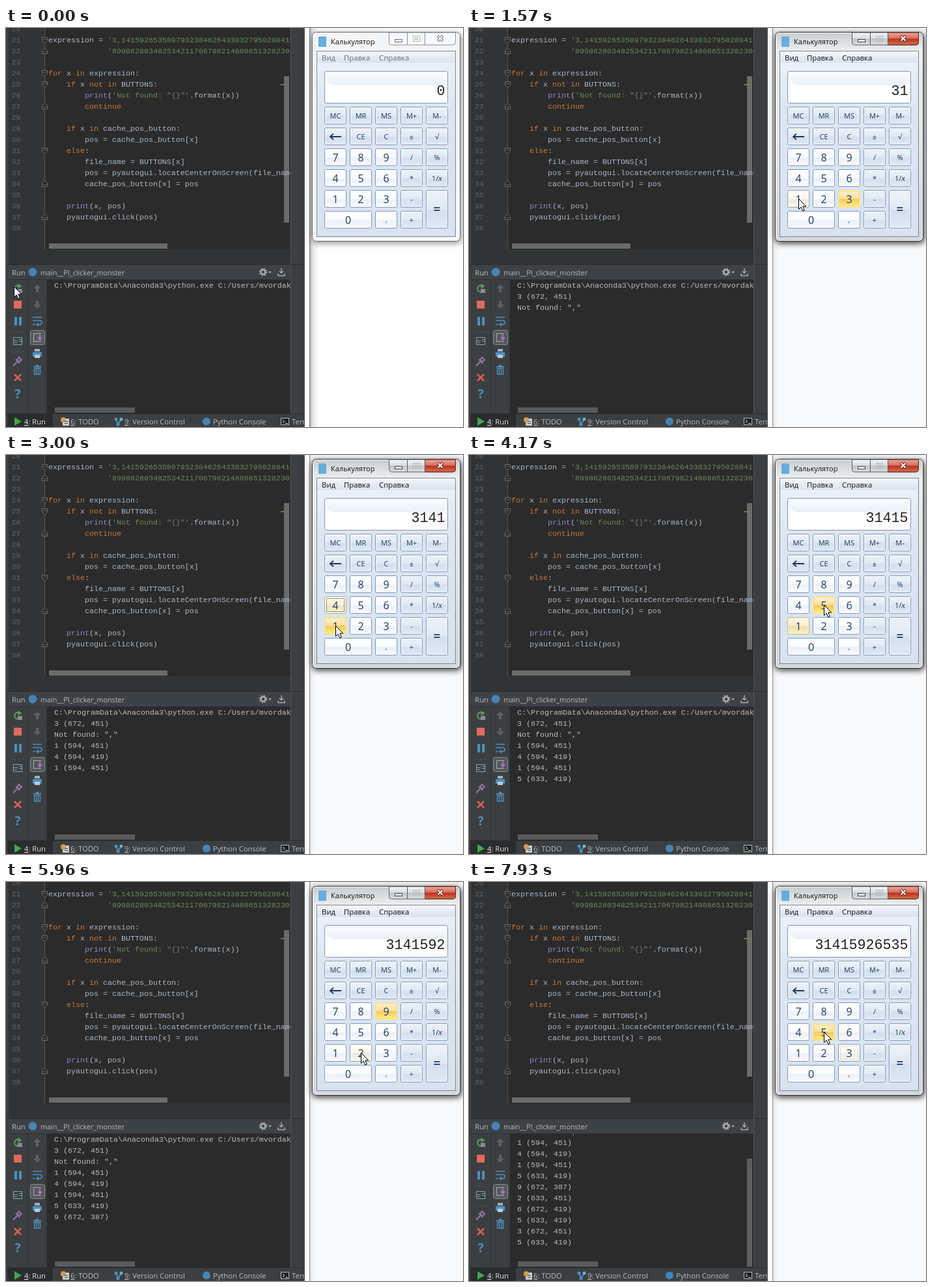
Write an HTML page that moves like this. It is 702x613 px and loops after 8 s.

```html
<!DOCTYPE html>
<html lang="en">
<head>
<meta charset="utf-8">
<title>Calculator clicker</title>
<style>
html, body { margin: 0; width: 702px; height: 613px; overflow: hidden; background: #fff; }
svg { display: block; }
text { white-space: pre; }
.mono { font: 11.667px "Liberation Mono", monospace; }
.ui { font: 11.2px "Open Sans", sans-serif; }
.digits { font: 21.67px "Liberation Mono", monospace; }
.num { font: 16px "Open Sans", sans-serif; }
.op { font: 11px "Open Sans", "DejaVu Sans", sans-serif; }
.equals { font: 600 19px "Open Sans", sans-serif; }
</style>
</head>
<body>
<svg id="stage" width="702" height="613" xmlns="http://www.w3.org/2000/svg"></svg>
<script>
const LOOP = 8000, FADE = 880;
// enter time, digit, delay until the click registers
const MOVES = [[460, 3], [1570, 1], [2640, 4], [2730, 1], [3720, 5], [4710, 9], [5960, 2],
  [7030, 6], [7075, 5, 45], [7120, 3, 90], [7210, 5, 90]];
// time, number of console lines
const PRINTS = [[0, 1], [640, 3], [1750, 4], [2820, 6], [3900, 7], [4890, 8], [6140, 9], [7210, 13]];

const col = i => 489 + 39 * i, row = i => 121 + 32 * i;
const spot = d => [col((d - 1) % 3), row(4 - Math.floor((d - 1) / 3))];

const rect = (x, y, w, h, fill, more = '') =>
  `<rect x="${x}" y="${y}" width="${w}" height="${h}" fill="${fill}" ${more}/>`;
const path = (d, stroke, more = 'fill="none"') => `<path d="${d}" stroke="${stroke}" ${more}/>`;
const label = (x, y, s, cls, fill, more = '') =>
  `<text x="${x}" y="${y}" class="${cls}" fill="${fill}" ${more}>${s}</text>`;
const grad = (id, ...stops) => `<linearGradient id="${id}" x2="0" y2="1">` +
  stops.map(([o, c]) => `<stop offset="${o}" stop-color="${c}"/>`).join('') + '</linearGradient>';
const sideGrad = (id, from, to) => `<linearGradient id="${id}"><stop stop-color="${from}"/>` +
  `<stop offset=".4" stop-color="${to}" stop-opacity=".35"/><stop offset="1" stop-color="${to}" stop-opacity="0"/></linearGradient>`;
const clip = (id, x, y, w, h) => `<clipPath id="${id}">${rect(x, y, w, h, '#000')}</clipPath>`;

const defs = `<defs>
${grad('numBg', [0, '#fff'], [.5, '#fafcff'], [.52, '#eaf0f9'], [1, '#f8fbff'])}
${grad('opBg', [0, '#edf3fa'], [.5, '#e0e9f4'], [.52, '#d3dfee'], [1, '#dfe9f6'])}
${grad('hotBg', [0, '#fdf0d2'], [.48, '#fbe0a0'], [.52, '#f8c85c'], [1, '#fff08a'])}
${grad('client', [0, '#eef3fa'], [.3, '#dce6f2'], [1, '#d8e3f1'])}
${grad('menuBg', [0, '#fafbfe'], [.45, '#e6ebf6'], [1, '#dbe3f1'])}
${grad('screen', [0, '#f4f8fd'], [.45, '#fff'], [1, '#fff'])}
${grad('gloss', [0, '#fbfdff'], [1, '#e8f0f9'])}
${grad('glass', [0, '#c9cccf'], [.09, '#eceeef'], [.5, '#e4e7ea'], [1, '#d3d7db'])}
${grad('glassIdle', [0, '#f3f4f5'], [1, '#f7f8f9'])}
${grad('close', [0, '#eba99b'], [.48, '#d9695a'], [.52, '#b9301c'], [1, '#d6714c'])}
${grad('cap', [0, '#f4f5f6'], [.48, '#dadde0'], [.52, '#bfc3c7'], [1, '#dde0e3'])}
${sideGrad('edge', '#a9a9a9', '#bbb')}${sideGrad('edgeSoft', '#d9dadd', '#dcdde0')}
<filter id="blur" x="-20%" y="-20%" width="140%" height="140%"><feGaussianBlur stdDeviation="5"/></filter>
${clip('code', 0, 0, 437, 340)}${clip('out', 64, 387, 373, 194)}${clip('ide', 0, 0, 459, 613)}
</defs>`;

const KEY = '#cc7832', STR = '#6a8759', FN = '#8888c6';
const paint = (c, s) => `<tspan fill="${c}">${s}</tspan>`;
const kw = s => paint(KEY, s), str = s => paint(STR, s), fn = s => paint(FN, s);
const CODE = {
  21: `expression = ${str("'3,14159265358979323846264338327950288419716")}`,
  22: ' '.repeat(13) + str("'8998628034825342117067982148086513282306647"),
  24: `${kw('for')} x ${kw('in')} expression:`,
  25: `    ${kw('if')} x ${kw('not in')} BUTTONS:`,
  26: `        ${fn('print')}(${str(`'Not found: "{}"'`)}.format(x))`,
  27: `        ${kw('continue')}`,
  29: `    ${kw('if')} x ${kw('in')} cache_pos_button:`,
  30: '        pos = cache_pos_button[x]',
  31: `    ${kw('else')}:`,
  32: '        file_name = BUTTONS[x]',
  33: '        pos = pyautogui.locateCenterOnScreen(file_name)',
  34: '        cache_pos_button[x] = pos',
  36: `    ${fn('print')}(x, pos)`,
  37: '    pyautogui.click(pos)'
};

function editor() {
  let s = rect(4, 0, 56, 340, '#313335') + rect(60, 0, 377, 340, '#2b2b2b') +
    rect(427, 74, 8, 225, '#696b6c') + rect(422, 86, 13, 2, '#77734a') + rect(66, 331, 182, 8, '#696b6c') +
    path('M59.5 0V340', '#55585a');
  for (let n = 20; n <= 38; n++) {
    const y = 22 + 17 * (n - 21);
    s += label(8.5, y, n, 'mono', '#606366');
    if (CODE[n]) s += label(65, y, CODE[n], 'mono', '#a9b7c6');
  }
  const fold = (n, k) => {
    const y = 18.5 + 17 * (n - 21);
    s += path(`M55.5 ${y - 4 * k}h8v${5 * k}l-4 ${4 * k}l-4 ${-4 * k}zM57.5 ${y - k}h4`, '#6c6f71', 'fill="#2b2b2b"');
  };
  [21, 24, 25, 31].forEach(n => fold(n, 1));
  [22, 27, 34, 37].forEach(n => fold(n, -1));
  return rect(0, 0, 459, 613, '#3c3f41') + `<g clip-path="url(#code)">${s}</g>` +
    rect(4, 340, 433, 23, '#313335') + path('M0 363.500H459', '#2a2c2d');
}

function icons() {
  const blue = '#4d90bf', grey = '#5c6063', red = '#dd5f52', line = 'fill="none" stroke-width="2"';
  return path('M21 396.5a5 5 0 1 0 2 5', '#57a05b', line) + path('M18.500 393l6 3.500l-6 4z', 'none', 'fill="#57a05b"') +
    rect(18, 401, 7, 6, '#8b8f92') +
    rect(12, 419, 12, 12, '#e06a5c') + rect(13, 444, 4, 13, blue) + rect(20, 444, 4, 13, blue) +
    path('M8 467.500H29M8 497.500H29', '#5c6063', 'stroke-dasharray="1 2"') +
    path('M11.5 475.500h13v11h-13zM11 480.500h7M20 478.500h4M20 481.500h4M13 483.500h4', '#7fa3ba') +
    path('M11 519l6-6M15 509l6 6M17 510l3-4l4 4l-4 3z', '#9776ab', line) +
    path('M13 532l10 10M23 532l-10 10', red, 'stroke-width="2.500"') +
    label(18, 569, '?', 'ui', blue, 'text-anchor="middle" style="font-size:19px;font-weight:700"') +
    path('M48 394l6 6h-4v6h-4v-6h-4z', 'none', `fill="${grey}"`) +
    path('M48 431l6-6h-4v-6h-4v6h-4z', 'none', `fill="${grey}"`) +
    path('M41 444.500h14M41 449.500h11q3 0 3 3t-3 3h-4M41 455.500h4M50 453l-3 2.500l3 2.500', blue, 'fill="none" stroke-width="1.500"') +
    rect(37.5, 464.5, 22, 22, '#54595c', 'rx="3" stroke="#898d90"') +
    path('M42 469.500h12M42 481.500h12M42.500 470v11', '#a9adb0') + path('M52 471v7M49 475l3 4l3-4', '#b06fc0', line) +
    rect(41, 498, 14, 7, blue) + rect(44, 493, 8, 4, '#9ab3c4') + rect(44, 502, 8, 5, '#c0ccd4') +
    path('M42 520.500h12M46 518.500h4', blue, line) + path('M43.500 523h9v9h-9zM46.500 524v7M49.500 524v7', blue, 'fill="none" stroke-width="1.400"');
}

const LINES = [String.raw`C:\ProgramData\Anaconda3\python.exe C:/Users/mvordak/PycharmProjects`, ...[3, 0, 1, 4, 1, 5, 9, 2, 6, 5, 3, 5].map(d => {
  if (!d) return 'Not found: ","';
  const [x, y] = spot(d);
  return `${d} (${x + 105}, ${y + 202})`;
})];

function runPanel() {
  const tone = '#bbbbbb', tab = (x, key, s, fill = tone) =>
    label(x, 609, key ? `<tspan text-decoration="underline">${key}</tspan>: ${s}` : s, 'ui', fill);
  return rect(4, 364, 433, 22, '#3d4247') + path('M0 386.5H437', '#2f3133') +
    label(9, 380, 'Run', 'ui', tone) + '<circle cx="41" cy="375" r="6.5" fill="#4584b6"/>' +
    label(53, 380, 'main__PI_clicker_monster', 'ui', tone, 'style="font-size:10.85px"') +
    '<circle cx="395" cy="375" r="3.500" fill="none" stroke="#a9adaf" stroke-width="2.500"/>' +
    '<circle cx="395" cy="375" r="5.500" fill="none" stroke="#a9adaf" stroke-width="1.600" stroke-dasharray="2.200 2.120"/>' +
    path('M403 374h5l-2.500 3z', 'none', 'fill="#a9adaf"') +
    path('M423 369v7M420 373.500l3 3l3-3M418 377v3.500h10V377', '#a9adaf', 'fill="none" stroke-width="1.400"') +
    rect(63, 387, 374, 205, '#2b2b2b') + path('M33.500 387V592M62.500 387V592', '#323537') + icons() +
    rect(75, 583, 123, 8, '#595b5d') + rect(427, 425, 8, 166, '#5b5d5f', 'id="bar"') +
    `<g clip-path="url(#out)"><g id="lines">${LINES.map((s, i) => label(74, 399 + 17 * i, s, 'mono', tone)).join('')}</g></g>` +
    path('M437.500 0V592', '#515457') +
    rect(0, 592, 459, 21, '#3c3f41') + path('M0 592.500H459', '#2a2c2d') + rect(2, 593, 70, 20, '#2a2c2e') +
    '<g clip-path="url(#ide)">' +
    path('M13 598l11 6.500l-11 6.500z', 'none', 'fill="#3faa4c"') + tab(28, '4', 'Run', '#e4e4e4') +
    rect(87, 600, 10, 11, '#c9cdd0', 'rx="1"') + '<circle cx="88" cy="602" r="4" fill="#d59b4c"/>' + path('M90 604.500h5M90 607.500h5', '#4a4e51') + tab(99, '6', 'TODO') +
    path('M169 600l3 9l5-8', '#4d90bf', 'fill="none" stroke-width="2"') +
    '<circle cx="169" cy="601" r="2.500" fill="#4d90bf"/><circle cx="177" cy="601" r="2.500" fill="#6ab0d8"/><circle cx="172" cy="609" r="2.500" fill="#4d90bf"/>' + tab(182, '9', 'Version Control') +
    '<circle cx="308" cy="604.500" r="6" fill="#4584b6"/>' + tab(318, '', 'Python Console') +
    rect(422.5, 599.500, 12, 10, '#1d1f20', 'stroke="#b5b8ba"') + path('M425 602l3 2.500l-3 2.500M429 607.500h4', '#ddd') + tab(439, '', 'Terminal') + '</g>';
}

function button(x, y, w, h, s, cls, id = '') {
  const cx = x + w / 2, isNum = cls === 'num';
  const hot = id && `<g id="hot${id}" opacity="0">` +
    rect(x + .5, y + .5, w - 1, h - 1, 'url(#hotBg)', 'rx="2" stroke="#f6e5b8"') +
    rect(x + 1.500, y + 1.500, w - 3, h - 3, 'none', 'rx="1" stroke="#ffe24e"') + '</g>' +
    rect(x + 3.500, y + 3.500, w - 7, h - 7, 'none', `id="dots${id}" stroke="#333" stroke-dasharray="1 1" opacity="0"`);
  const drop = { num: 6.500, op: 4, equals: 6.500 }[cls];
  const text = s === '←'
    ? path(`M${cx + 9} ${y + 14}h-17m5-4.500l-5 4.500l5 4.500`, '#1e395b', 'fill="none" stroke-width="1.800"')
    : label(cx, y + h / 2 + drop, s, cls, '#1e395b', 'text-anchor="middle"');
  return rect(x + .5, y + .5, w - 1, h - 1, isNum || s === ',' ? 'url(#numBg)' : 'url(#opBg)', 'rx="2" stroke="#8297b5"') +
    rect(x + 1.500, y + 1.500, w - 3, h - 3, 'none', 'rx="1" stroke="#fff" stroke-opacity=".75"') + hot + text;
}

function keypad() {
  const keys = ['MC MR MS M+ M-', '← CE C ± √', '7 8 9 / %', '4 5 6 * 1/x', '1 2 3 -'];
  let s = '';
  keys.forEach((r, j) => r.split(' ').forEach((k, i) => {
    const num = /^\d$/.test(k);
    const face = k === '1/x' ? '1/<tspan font-style="italic" font-family="Liberation Serif, serif" font-size="13">x</tspan>' : k;
    s += button(col(i), row(j), 34, 27, face, num ? 'num' : 'op', num ? k : '');
  }));
  return s + button(489, 281, 73, 27, '0', 'num') + button(567, 281, 34, 27, ',', 'op') +
    button(606, 281, 34, 27, '+', 'op') + button(645, 249, 34, 59, '=', 'equals');
}

function frame(on) {
  const ink = on ? '#3d4045' : '#6d7175', edge = on ? '#5a5d61' : '#8d9195';
  const back = on ? 'url(#cap)' : '#f8f9fa';
  return `<g id="${on ? 'active' : 'idle'}">` +
    (on ? rect(466, 0, 236, 613, '#f8f9fb') : '') + rect(466, 0, on ? 9 : 14, 613, on ? 'url(#edgeSoft)' : 'url(#edge)') +
    path('M466.500 0V613', on ? '#8b8d90' : '#77797c') +
    rect(470, 8, 230, 323, '#000', `rx="8" filter="url(#blur)" opacity="${on ? .75 : .42}"`) +
    rect(470.5, 6.500, 227, 321, on ? 'url(#glass)' : 'url(#glassIdle)', `rx="6" stroke="${on ? '#33363a' : '#65696d'}"`) +
    rect(471.5, 7.500, 225, 319, 'none', 'rx="5" stroke="#fff" stroke-opacity=".8"') +
    path('M588.500 7V22q0 4 4 4H686.500q4 0 4-4V7z', edge, `fill="${back}"`) +
    (on ? path('M643.500 7V26H686.500q4 0 4-4V7z', '#5b211a', 'fill="url(#close)"') : '') +
    path('M616.500 7V26M643.500 7V26', edge) +
    rect(597.5, 17.500, 11, 4, '#fff', `stroke="${ink}"`) +
    rect(625.5, 12.500, 10, 8, 'none', 'stroke="#b4b7ba"') + rect(628.5, 15.500, 4, 2, 'none', 'stroke="#b4b7ba"') +
    path('M663 12l8 8M671 12l-8 8', on ? '#5b2a25' : ink, 'stroke-width="4"') +
    path('M663.500 12.500l7 7M670.500 12.500l-7 7', '#fff', 'stroke-width="2"') + '</g>';
}

function calculator() {
  const menu = [[485, 'Вид'], [519, 'Правка'], [573, 'Справка']].map(([x, s]) =>
    label(x, 50, s, 'ui', 'currentColor', 'style="font-size:11.4px"')).join('');
  return frame(false) + frame(true) +
    rect(480, 13, 12, 16, '#64aede', 'rx="1"') + label(499, 25, 'Калькулятор', 'ui', '#111', 'style="font-size:11px"') +
    rect(477.5, 35.500, 213, 285, 'url(#client)', 'stroke="#7e868f"') + rect(478, 36, 212, 18, 'url(#menuBg)') +
    path('M478 54.500H690', '#f3f6fb') + `<g id="menu">${menu}</g>` +
    rect(489.5, 66.500, 189, 49, 'url(#screen)', 'rx="3" stroke="#8496b0"') +
    path('M492 68H677V79Q677 88 664 88H508Q492 88 492 74z', 'none', 'fill="url(#gloss)"') +
    label(674.5, 103, '0', 'digits', '#222', 'id="value" text-anchor="end"') + keypad();
}

const $ = id => document.getElementById(id);
$('stage').innerHTML = defs + rect(0, 0, 702, 613, '#fff') + editor() + runPanel() +
  rect(459, 0, 7, 613, '#fcfcfc') + path('M458.500 0V613', '#55585a') + calculator() +
  path('M.5 .5v16l3.700-3.500l2.500 6l2.600-1.100l-2.500-5.900h5z', '#000', 'id="cursor" fill="#fff"');

const lines = [...$('lines').children];
const last = (table, t) => table.filter(r => r[0] <= t).pop();

function heat(d, t) {
  let hot = 0, dots = 0;
  MOVES.forEach(([enter, digit], i) => {
    if (digit !== d || t < enter) return;
    const leave = MOVES[i + 1] ? MOVES[i + 1][0] : LOOP;
    const rise = Math.min(1, .15 + (Math.min(t, leave) - enter) / 250);
    const now = rise * Math.max(0, 1 - Math.max(0, t - leave) / FADE);
    hot = Math.max(hot, now);
    if (t >= leave && leave - enter < 100) dots = Math.min(1, now * 3);
  });
  return [hot, dots];
}

function draw(t) {
  const on = t >= 460, move = last(MOVES, t);
  $('active').style.display = on ? '' : 'none';
  $('idle').style.display = on ? 'none' : '';
  $('menu').style.color = on ? '#111' : '#686d75';
  $('value').textContent = MOVES.filter(([e, , wait = 0]) => t >= e + wait).map(m => m[1]).join('') || '0';
  const [x, y] = move ? spot(move[1]).map((v, i) => v + [17, 13][i]) : [12, 397];
  $('cursor').setAttribute('transform', `translate(${x} ${y})`);
  for (let d = 1; d <= 9; d++) {
    const [hot, dots] = heat(d, t);
    $('hot' + d).setAttribute('opacity', hot);
    $('dots' + d).setAttribute('opacity', dots);
  }
  const count = last(PRINTS, t)[1], scrolled = count > 11;
  lines.forEach((el, i) => { el.style.display = i < count ? '' : 'none'; });
  $('lines').setAttribute('transform', `translate(0 ${scrolled ? -46 : 0})`);
  $('bar').style.display = scrolled ? '' : 'none';
}

const start = performance.now();
(function tick() {
  draw((performance.now() - start) % LOOP);
  requestAnimationFrame(tick);
})();
</script>
</body>
</html>
```
